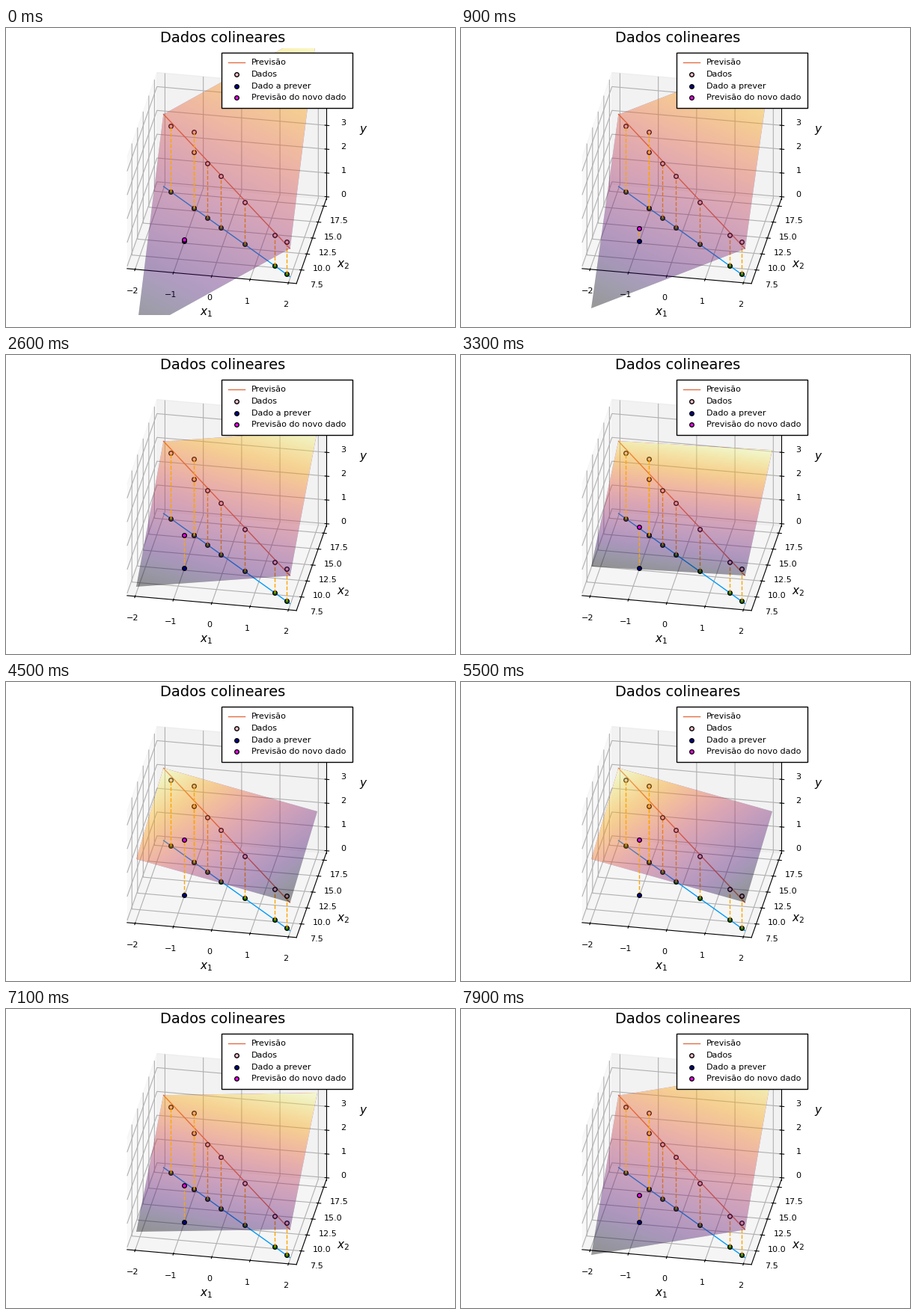
Animation, 600 px wide and 400 px high, one loop 8000 ms. Source, as a matplotlib script:

```python
import numpy as np
import matplotlib.pyplot as plt
from matplotlib.animation import ArtistAnimation
from matplotlib.transforms import Affine2D
from mpl_toolkits.mplot3d import proj3d

W, H, DPI = 600, 400, 100
SIDE = 357
FRAMES, INTERVAL = 80, 100

plt.rcParams.update({"font.family": "DejaVu Sans", "font.size": 8})
fig = plt.figure(figsize=(W / DPI, H / DPI), dpi=DPI, facecolor="white")
rect = [111.6 / W, 16 / H, SIDE / W, SIDE / H]

# Box, grid and axes
box = fig.add_axes(rect, projection="3d", proj_type="ortho", elev=30, azim=-80)
box.set_xlim(-2.2083, 2.2083)
box.set_ylim(5.375, 18.625)
box.set_zlim(-0.09375, 4.59375)
box.set_xticks(range(-2, 3))
box.set_yticks(np.arange(7.5, 18, 2.5))
box.set_zticks(range(5))
box.tick_params(labelsize=8)
box.tick_params(axis="x", pad=4.5)
box.tick_params(axis="y", pad=4)
box.set_xlabel("$x_1$", fontsize=11)
box.set_ylabel("$x_2$", fontsize=11)
box.set_zlabel("$y$", fontsize=11)
for axis in (box.xaxis, box.yaxis, box.zaxis):
    axis.set_rotate_label(False)

# Flat layer with the projected data
layer = fig.add_axes(rect)
layer.set_axis_off()
layer.set_xlim(*box.viewLim.intervalx)
layer.set_ylim(*box.viewLim.intervaly)
layer.set_autoscale_on(False)
layer.set_title("Dados colineares", fontsize=14, y=1.0)

PROJ = box.get_proj()


def project(x, y, z):
    x, y, z = np.broadcast_arrays(*(np.atleast_1d(v).astype(float)
                                    for v in (x, y, z)))
    u, v, _ = proj3d.proj_transform(x, y, z, PROJ)
    return np.asarray(u), np.asarray(v)


def line(x, y, z, color, zorder, **kw):
    return layer.plot(*project(x, y, z), color=color, lw=1, zorder=zorder, **kw)[0]


def dots(x, y, z, color, zorder, **kw):
    return layer.scatter(*project(x, y, z), s=16, c=color, edgecolors="black",
                         linewidths=1, zorder=zorder, **kw)


def drop(x, y, z, zorder):
    return line([x, x], [y, y], [0, z], "orange", zorder, ls="--")


def road(x):
    return 12 - 3 * x


xs = np.array([-1.77, -1.036, -1.036, -0.616, -0.19, 0.569, 1.517, 1.896])
zs = np.array([2.75, 3.208, 2.36, 2.29, 2.155, 1.77, 1.28, 1.363])
slope, base = np.polyfit(xs, zs, 1)


def plane(x, y, tilt):
    return base + slope * x + tilt * (y - road(x))


ends = np.array([-2.0, 2.0])
line(ends, road(ends), 0, "#009afa", 2)
fit = line(ends, road(ends), base + slope * ends, "#e26f46", 2, label="Previsão")
dots(xs, road(xs), 0, "green", 3)
for x, z in zip(xs, zs):
    drop(x, road(x), z, 7 if x < -1 else 4)
data = dots(xs, road(xs), zs, "pink", 5, label="Dados")

NEW_X, NEW_Y = -1, 10
query = dots(NEW_X, NEW_Y, 0, "darkblue", 8, label="Dado a prever")

gx, gy = np.meshgrid(np.linspace(-2, 2, 160), np.linspace(6, 18, 160))
corner_x, corner_y = np.array([-2, 2, -2]), np.array([6, 6, 18])


def sheet(tilt):
    """Colour map of the plane's height, sheared onto its projected outline."""
    u, v = project(corner_x, corner_y, plane(corner_x, corner_y, tilt))
    shear = Affine2D.from_values(u[1] - u[0], v[1] - v[0],
                                 u[2] - u[0], v[2] - v[0], u[0], v[0])
    return layer.imshow(plane(gx, gy, tilt), cmap="inferno", alpha=0.4,
                        origin="lower", extent=(0, 1, 0, 1), aspect="auto",
                        interpolation="nearest", zorder=6,
                        transform=shear + layer.transData)


def scene(i):
    tilt = abs(0.5 - 0.01 * i)
    z = plane(NEW_X, NEW_Y, tilt)
    guess = dots(NEW_X, NEW_Y, z, "magenta", 9, label="Previsão do novo dado")
    return [sheet(tilt), drop(NEW_X, NEW_Y, z, 7), guess]


scenes = [scene(i) for i in range(FRAMES)]

legend = layer.legend(handles=[fit, data, query, scenes[0][2]], loc="upper right",
                      fontsize=8, borderpad=0.8, scatterpoints=1, fancybox=False,
                      edgecolor="black", facecolor="white", framealpha=1)
legend.set_zorder(20)

anim = ArtistAnimation(fig, scenes, interval=INTERVAL, repeat=True, repeat_delay=0)
plt.show()
```
